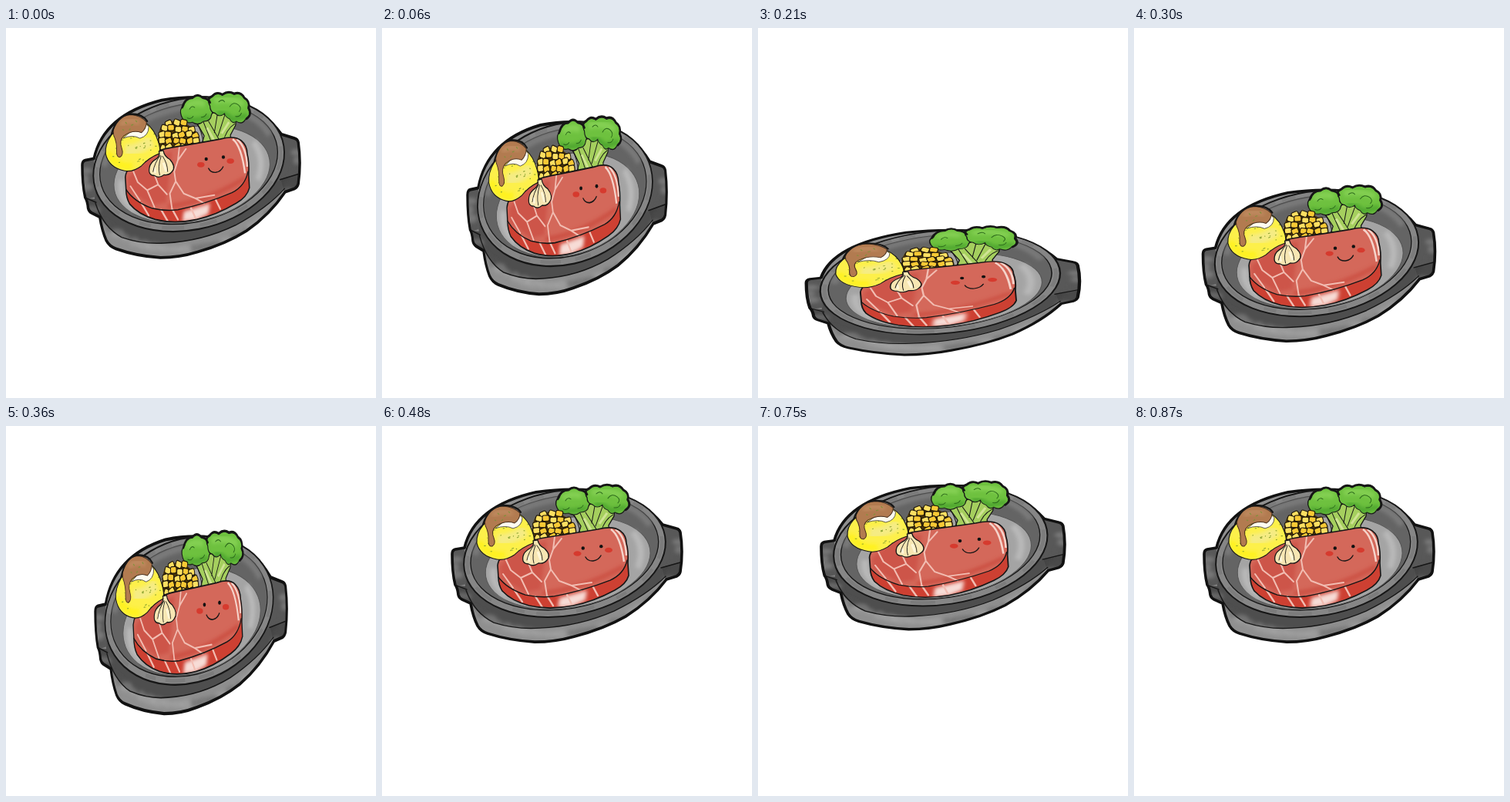
Write an HTML page that moves like this. It is 480 px wide and 480 px high and loops after 900 ms.

```html
<!DOCTYPE html>
<html lang="en">
<head>
<meta charset="utf-8">
<title>Bouncing steak plate</title>
<style>
html, body { margin: 0; width: 100%; height: 100%; overflow: hidden; background: #fff; }
svg { display: block; width: 100vw; height: 100vh; }
.ink { fill: none; stroke: #161616; stroke-width: 1.4; stroke-linecap: round; stroke-linejoin: round; }
.line { stroke: #161616; stroke-width: 1.3; stroke-linejoin: round; }
.bold { stroke: #111; stroke-width: 3.6; stroke-linejoin: round; stroke-linecap: round; }
.fat { fill: none; stroke: #f2bdb2; stroke-width: 2; stroke-linecap: round; stroke-linejoin: round; }
.leaf { fill: none; stroke: #2c6a1b; stroke-width: 1; stroke-linecap: round; }
</style>
</head>
<body>
<svg viewBox="0 0 480 480">
<defs>
  <filter id="soft" x="-30%" y="-30%" width="160%" height="160%"><feGaussianBlur stdDeviation="2.5"/></filter>
  <clipPath id="bodyClip"><path id="bodyShape" d="M107 158 L95 160 Q91 161 91 166 Q91 190 95 206 Q98 210 99 219 Q100 223 104 225 L115 230 Q118 247 124 259 Q128 266 137 269 Q165 278 198 280 Q224 280 249 273 Q288 263 316 247 Q348 227 369 199 L382 195 Q386 193 387 189 Q391 163 387 138 Q386 134 382 133 L364 128 Q340 98 300 88 Q255 78 200 86 Q120 104 107 158 Z"/></clipPath>
  <clipPath id="steakClip"><path id="steakShape" d="M150 181 Q151 169 168 160 Q192 147 216 144 Q250 139 280 134 Q300 129 309 136 Q317 142 317 152 Q320 162 319 178 L320 194 Q317 205 302 213 Q274 228 248 233 Q217 239 191 233 Q168 227 156 214 Q151 206 151 196 Z"/></clipPath>
  <clipPath id="potatoClip"><path id="potatoShape" d="M123 152 Q122 140 131 129 Q150 110 178 114 Q190 122 195 137 Q199 147 196 152 Q182 157 172 167 Q160 175 149 173 Q127 169 123 152 Z"/></clipPath>
  <clipPath id="leafClip"><path id="crownL" d="M227 106 Q223 97 230 93 Q232 83 242 84 Q249 77 256 83 Q265 84 265 91 Q273 96 268 104 Q267 112 257 112 Q250 118 242 113 Q232 116 227 106 Z"/><path id="crownR" d="M266 93 Q261 85 269 82 Q275 75 283 80 Q291 74 299 79 Q308 76 313 84 Q321 87 318 96 Q324 104 315 109 Q310 117 302 112 Q297 116 293 109 Q287 107 286 102 Q279 108 273 102 Q266 101 266 93 Z"/></clipPath>
</defs>

<g id="plate">
  <use href="#bodyShape" fill="#8f8f8f"/>
  <g clip-path="url(#bodyClip)">
    <path d="M104 165 L109 219 Q121 243 145 255 Q174 264 204 262 Q255 260 301 240 Q344 219 368 194 L372 140 Z" fill="#4e4e4e"/>
    <path d="M90 158 L107 157 L109 205 L97 208 Z M364 127 L392 133 L387 178 L358 186 Z" fill="#585858"/>
    <path d="M96 207 L109 208 L117 231 L98 224 Z M363 183 L390 176 L387 198 L368 200 Z" fill="#444"/>
    <g id="bodyTone" filter="url(#soft)"></g>
  </g>
  <path class="ink" d="M109 213 Q120 243 145 255 Q174 264 204 262 Q255 260 301 240 Q344 219 368 195"/>
  <path class="ink" d="M97 207 L110 212 M362 184 L387 177"/>
  <use href="#bodyShape" class="bold" fill="none"/>

  <g transform="rotate(-9.7 237 165)">
    <ellipse class="line" cx="237" cy="165" rx="132" ry="81" fill="#868686" style="stroke-width:2"/>
    <g id="rimTone"></g>
    <ellipse class="line" cx="237" cy="164" rx="123" ry="73" fill="#646464"/>
    <path d="M122 148 A118 69 0 0 1 352 148" fill="none" stroke="#7a7a7a" stroke-width="8" filter="url(#soft)"/>
    <ellipse cx="239" cy="178" rx="108" ry="58" fill="#a4a4a4" stroke="#555"/>
    <path d="M143 169 Q135 190 155 207 M329 153 Q342 176 327 200" fill="none" stroke="#b9b9b9" stroke-width="8" filter="url(#soft)"/>
  </g>

  <!-- broccoli -->
  <path class="line" d="M246 111 L266 103 L275 100 L302 109 L301 117 L294 129 L295 142 L253 145 L258 130 Z" fill="#a5cf5e"/>
  <path class="ink" d="M248 115 Q255 124 257 139 M257 113 L268 138 M264 112 L280 137 M276 104 L272 126 M286 105 L277 130 M300 115 Q288 122 284 138" style="stroke-width:1"/>
  <path d="M262 120 L272 136 M292 113 L282 127" stroke="#cfe394" stroke-width="3"/>
  <use href="#crownL" class="line" fill="#6ec13f"/>
  <use href="#crownR" class="line" fill="#6ec13f"/>
  <g clip-path="url(#leafClip)">
    <path d="M229 108 Q244 114 266 106 M276 102 Q290 102 296 110 L317 105" fill="none" stroke="#4da52f" stroke-width="6" filter="url(#soft)"/>
    <path d="M234 94 Q245 86 259 91 M272 87 Q292 82 312 91" fill="none" stroke="#84d052" stroke-width="8" filter="url(#soft)"/>
  </g>
  <path class="leaf" d="M238 97 q3 -5 7 -2 M235 108 q5 2 8 -2 M254 107 q5 0 7 -4 M278 88 q5 -4 8 0 M293 94 q5 -7 12 -2 q5 4 1 8 M301 106 q6 1 8 -4"/>
  <path class="ink" d="M228 95 Q232 83 242 83 Q249 77 256 83 Q264 84 266 89 Q261 84 269 81 Q275 75 283 79 Q291 74 299 78 Q308 75 313 83 Q321 87 319 96 Q324 104 316 109" style="stroke-width:2.8"/>

  <!-- corn -->
  <path d="M199 118 Q218 106 235 116 Q257 128 251 143 L226 149 L198 152 Q190 138 199 118 Z" fill="#4a3508"/>
  <g id="corn"></g>

  <!-- steak -->
  <use href="#steakShape" fill="#cd4032"/>
  <g clip-path="url(#steakClip)">
    <path d="M149 174 L155 155 L230 135 L307 128 L319 140 L318 174 Q314 192 296 200 Q260 214 222 221 Q205 223 186 219 Q162 211 151 196 Z" fill="#d4685a"/>
    <path d="M153 182 L175 160 L214 149 L206 212 L186 216 L155 198 Z" fill="#cd5549" filter="url(#soft)"/>
    <path d="M208 217 Q262 211 314 182" fill="none" stroke="#cb4d41" stroke-width="5" filter="url(#soft)"/>
    <path d="M297 134 Q309 142 314 176 M303 134 Q316 144 317 168" fill="none" stroke="#f5d3ca" stroke-width="2.5"/>
    <path d="M230 223 L266 213 L264 226 L247 234 L228 236 Z" fill="#f7dcd6" filter="url(#soft)"/>
    <path class="fat" d="M224 144 L222 160 L217 174 L219 186 L211 201 L214 220 M222 160 L233 146 M219 186 L230 201 L246 207 L258 213 M161 174 L167 187 L180 197 L190 218 M180 197 L195 190 L207 202 M195 190 L190 178 M246 207 L272 203 M157 192 L170 210"/>
    <path class="fat" d="M172 213 L182 228 M199 221 L208 235 M214 220 L222 233 M240 219 L247 233 M274 209 L280 220" style="stroke-width:2.4"/>
  </g>
  <path class="ink" d="M151 196 Q162 211 186 219 Q205 223 222 221 Q260 214 296 200 Q314 192 318 174"/>
  <use href="#steakShape" class="ink" style="stroke-width:1.6"/>
  <g fill="#d63a2e"><ellipse cx="253.5" cy="165.5" rx="5" ry="3.2"/><ellipse cx="294" cy="161" rx="5" ry="3.2"/></g>
  <g fill="#111"><circle cx="260.8" cy="158.5" r="2.2"/><circle cx="284.3" cy="156.2" r="2.2"/></g>
  <path class="ink" d="M264 170 Q267 175.500 274 175 Q281 174 284 168"/>

  <!-- potato -->
  <use href="#potatoShape" fill="#fdf04a"/>
  <g clip-path="url(#potatoClip)">
    <path d="M126 150 Q138 170 160 167" fill="none" stroke="#fff21c" stroke-width="8" filter="url(#soft)"/>
    <path d="M150 148 Q168 148 186 136" fill="none" stroke="#f5ec84" stroke-width="14" filter="url(#soft)"/>
    <g id="herbs"></g>
  </g>
  <use href="#potatoShape" class="ink" style="stroke-width:1.1"/>
  <path d="M147 133 Q160 128 170 133 Q182 130 182 119 L174 111 Z" fill="#fffbef" stroke="#333" stroke-width=".8"/>
  <path d="M134 129 Q132 120 139 112 Q147 104 158 104 Q171 105 179 113 Q179 121 172 126 Q160 122 148 130 Q141 136 145 145 Q148 153 143 156 Q138 157 138 149 Q139 139 134 129 Z" fill="#b27b50" stroke="#4a2f1c"/>
  <path d="M143 116 Q156 108 169 114" fill="none" stroke="#c08b60" stroke-width="6" filter="url(#soft)"/>
  <path d="M150 113 l2 2 M158 117 l3 -1 M164 111 l2 2 M155 123 l2 -2 M146 122 l2 1" stroke="#83913c" stroke-width="1.3"/>
  <path class="ink" d="M131 128 Q138 105 157 103 Q174 103 180 112" style="stroke-width:2.2"/>

  <!-- garlic -->
  <path class="line" d="M196 149 L202 148 Q203 155 211 159 Q220 168 214 174 Q210 179 203 178 Q196 183 190 179 Q181 179 183 169 Q184 163 193 158 Q198 154 196 149 Z" fill="#f7e6b3"/>
  <path d="M190 169 L191 176 M202 163 L206 174" stroke="#fff6d9" stroke-width="3"/>
  <path class="ink" d="M198 154 Q190 163 188 174 M199 155 Q194 168 197 178 M201 155 Q208 164 208 174" style="stroke-width:.9"/>
</g>
</svg>
<script>
const $ = id => document.getElementById(id);

let seed = 7;
const rnd = () => (seed = seed * 16807 % 2147483647) / 2147483647;

function add(parent, tag, attrs) {
  const el = document.createElementNS('http://www.w3.org/2000/svg', tag);
  for (const k in attrs) el.setAttribute(k, attrs[k]);
  $(parent).append(el);
}

// corn kernels in loose rows
[3, 5, 6, 6, 6].forEach((count, row) => {
  for (let i = 0; i < count; i++) {
    const x = 220 + row * 1.2 + (i - (count - 1) / 2) * 9.2 + rnd() * 3 - 1.5;
    const y = 113.5 + row * 7.6 + rnd() * 3 - 1.5;
    add('corn', 'rect', {
      x: x - 4.5, y: y - 3.7, width: 9, height: 7.4, rx: 2.2,
      fill: rnd() < 0.4 ? '#fddf62' : '#f8c935', stroke: '#1d160a', 'stroke-width': 1.1,
      transform: `rotate(${rnd() * 80 - 40} ${x} ${y})`
    });
  }
});

// herb specks
for (let i = 0; i < 36; i++) {
  const x = 129 + rnd() * 62, y = 127 + rnd() * 37;
  add('herbs', 'path', {
    d: `M${x} ${y} l${1 + rnd() * 2} ${rnd() * 2 - 1.5}`,
    stroke: '#8ba330', 'stroke-width': 1.1
  });
}

// watercolour tones on the iron
for (let i = 0; i < 34; i++) {
  const a = i / 34 * Math.PI * 1.1 - 0.1;
  add('bodyTone', 'ellipse', {
    cx: 240 + 145 * Math.cos(a), cy: 172 + 97 * Math.sin(a) - 12 * Math.cos(a),
    rx: 5 + rnd() * 7, ry: 3 + rnd() * 3,
    fill: rnd() < 0.5 ? '#b5b5b5' : '#555', opacity: 0.35
  });
}
for (let i = 0; i < 14; i++) {
  add('rimTone', 'ellipse', {
    cx: 237, cy: 164.5, rx: 127.5, ry: 77, fill: 'none', pathLength: 100,
    stroke: rnd() < 0.5 ? '#9a9a9a' : '#727272', 'stroke-width': 4, opacity: 0.5,
    'stroke-dasharray': `${2 + rnd() * 4} 100`, 'stroke-dashoffset': -i * 7
  });
}

// centre height and width for each step from the top of the bounce to the landing
const centre = [166.5, 167, 167.5, 168.5, 170, 173, 178, 190.5, 208.5, 230, 254.5, 281.5, 305, 325, 340.5];
const width = [320, 320, 319, 318, 315, 309, 301, 285, 273, 261, 251, 275, 304, 333, 358];

function draw(ms) {
  const tick = Math.floor(ms % 900 / 30);
  const step = tick - (tick > 7) - (tick > 22); // top and landing are held twice as long
  const phase = (step + 7) % 28;
  const d = Math.min(phase, 28 - phase);
  const squash = width[d] / 306 - 1;
  const sx = width[d] / 301, sy = 203 * (1 - squash) / 206;
  $('plate').setAttribute('transform',
    `translate(240.5 ${centre[d]}) scale(${sx} ${sy}) translate(-240.5 -178)`);
}

const start = performance.now();
function loop() {
  draw(performance.now() - start);
  requestAnimationFrame(loop);
}
loop();
</script>
</body>
</html>
```
